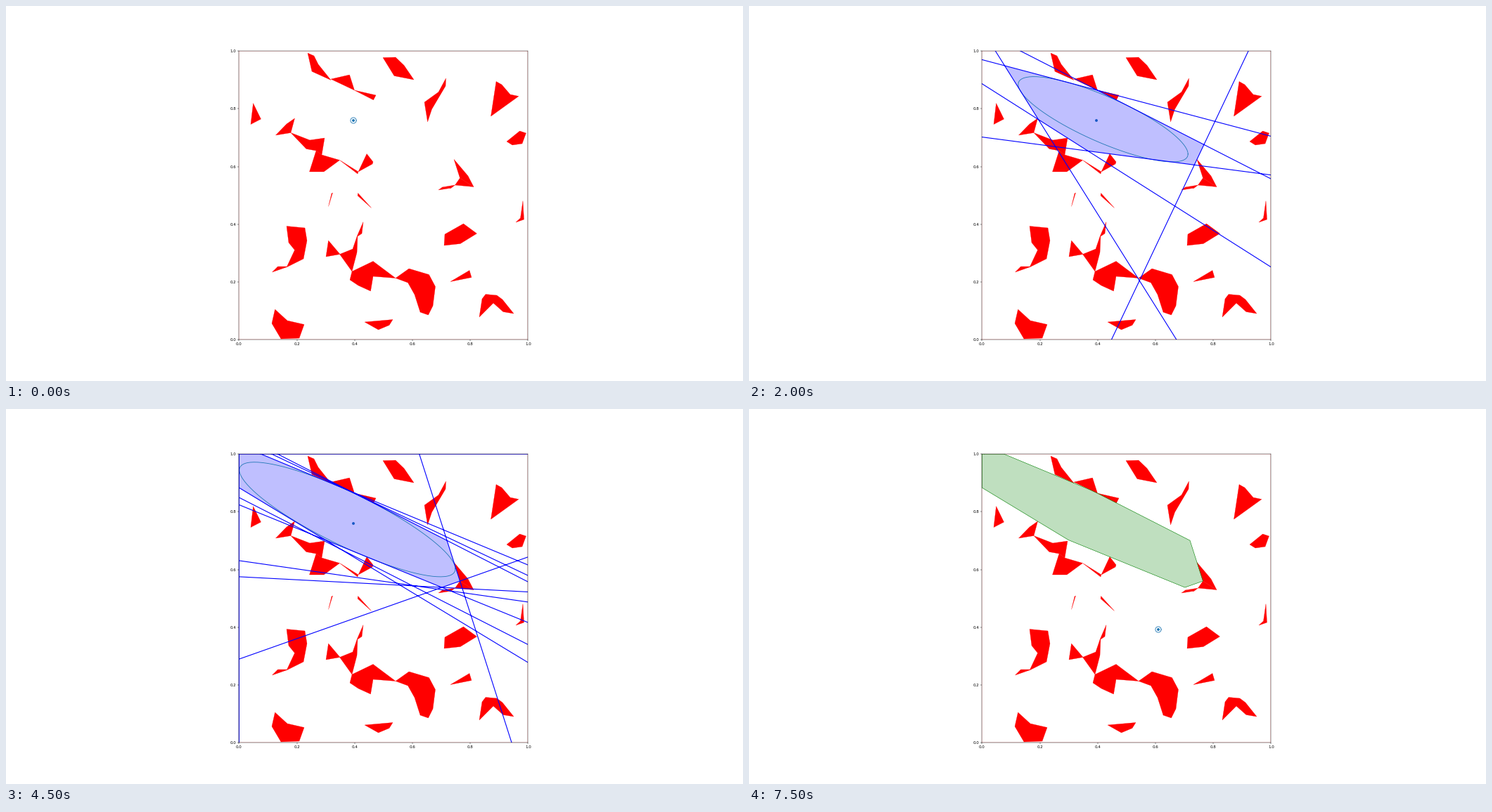
These frames come from a looping animation (1048 px wide and 534 px high, 8 s). A matplotlib script:

```python
import numpy as np
import matplotlib.pyplot as plt
from matplotlib.animation import FuncAnimation

W, H, DPI = 1048, 534, 40
# Plot box on the stage, in pixels from the top left
L, R, T, B = 331.4, 742.4, 64.1, 475.2
STEP_MS, STEPS = 500, 16
FIRST_DONE = 13

fig = plt.figure(figsize=(W / DPI, H / DPI), dpi=DPI)
ax = fig.add_axes([L / W, 1 - B / H, (R - L) / W, (B - T) / H])
ax.set_xlim(0, 1)
ax.set_ylim(0, 1)

rocks = []


def unit(points):
    """Stage pixels to axes units."""
    p = np.asarray(points, float)
    return np.column_stack([(p[:, 0] - L) / (R - L), (B - p[:, 1]) / (B - T)])


def rock(*points):
    rocks.append(np.array(points, float))
    ax.fill(*unit(points).T, color="red", lw=0.5)


# Top
rock((429, 67), (438, 71), (444, 83), (462, 105.5), (435, 93.2))
rock((462, 104.1), (488.5, 98), (495.5, 120))
rock((495.5, 120), (526, 127), (522.5, 133.8))
rock((536, 73.5), (554, 73), (566, 84.5), (580, 105), (552, 99.5))
rock((625.5, 103), (625, 114), (605.5, 147), (599.5, 165), (595, 137),
     (615, 122.5))
rock((697, 107.5), (705, 112), (717, 126), (729, 128.5), (689.5, 157))
rock((351.5, 138.5), (362.5, 161), (348, 168.5))
rock((712, 193), (730.5, 178), (739.5, 181), (734, 196), (720, 198))

# Chain in the middle
rock((383.5, 184), (399, 168), (410.5, 160), (405, 180.5))
rock((405, 180.5), (432, 191), (453, 188), (449, 212), (441, 206),
     (427, 203.5))
rock((441, 206), (449, 212), (474.5, 219.5), (452, 236), (431.5, 236))
rock((474.5, 219.5), (501, 236), (500, 239))
rock((501, 236), (513, 210.5), (522, 222), (521, 225))

# Hook on the right
rock((637, 218.4), (657, 242), (665, 257.5), (645.5, 245))
rock((645.5, 245), (665, 257.5), (638.5, 255))
rock((638.5, 255), (633, 259.2), (620.5, 258))
rock((633, 259.2), (615, 262), (620.5, 258))

# Slivers
rock((464.5, 266), (458.5, 285.5), (463, 267))
rock((500.5, 266.5), (519.5, 287.5), (500, 270))
rock((735, 277.5), (736.5, 304), (725, 308), (731.5, 302))

# Bottom
rock((399, 313.5), (425, 316), (428, 334), (423, 360), (400, 371.5),
     (378.5, 379), (386.5, 371), (399.5, 371), (410.5, 347.5), (402, 337))
rock((455, 357), (458.5, 334), (475, 353.5))
rock((508, 307.5), (506, 324), (500, 328), (499, 351), (492, 378),
     (474.5, 353.5), (493, 346), (499.5, 327))
rock((492, 378), (522, 363.5), (554, 387.5), (522, 385), (518.5, 406),
     (501, 398), (489, 390))
rock((554, 387.5), (573, 374), (601.5, 382.5), (610.5, 399.5), (607, 427),
     (600.5, 440), (589, 436), (581, 411), (571.5, 394))
rock((650.5, 310), (669.5, 324), (646, 338.5), (623, 341), (624, 325))
rock((632, 392.5), (659, 376.5), (662, 386.5))
rock((673, 443), (677, 417), (682, 410.5), (698, 412), (706, 418),
     (722, 438), (707, 435.5), (693, 423))
rock((382.5, 432), (400, 448), (424, 453.5), (417, 473), (391, 474),
     (378, 452))
rock((510, 450), (550, 446.5), (545, 454.5), (529.5, 461))

# Walls
BOX = [(L, T), (R, T), (R, B), (L, B)]
for a, b in zip(BOX, BOX[1:] + BOX[:1]):
    rock(a, b)

# Growing ellipse: centre, half width, half height, correlation
ELLIPSES = [
    (494, 163, 4.1, 4.1, 0),
    (495.3, 161.1, 65, 41.3, 0.415),
    (503.5, 161.3, 120.7, 60.7, 0.8155),
    (483.3, 157, 151.4, 80.4, 0.862),
    (485.4, 157.3, 153.5, 81.6, 0.861),
]
SEEDS = [(494, 163), (444.7, 181.7), (582, 314)]


def oval(cx, cy, rx, ry, corr):
    t = np.linspace(0, 2 * np.pi, 181)
    x = cx + rx * np.cos(t)
    y = cy + ry * (corr * np.cos(t) + np.sqrt(1 - corr**2) * np.sin(t))
    return unit(np.column_stack([x, y]))


def disc(seed, radius):
    return oval(*seed, radius, radius, 0)


def nearest(points, centre, metric):
    """Closest outline point to the centre, and its squared distance."""
    a, b = points, np.roll(points, -1, axis=0)
    e, d = b - a, centre - a
    k = np.sum(d @ metric * e, axis=1) / np.sum(e @ metric * e, axis=1)
    p = a + np.clip(k, 0, 1)[:, None] * e
    dist = np.sum((p - centre) @ metric * (p - centre), axis=1)
    i = dist.argmin()
    return p[i], dist[i]


def carve(cx, cy, rx, ry, corr):
    """Lines (point, normal) that part the ellipse from every rock."""
    centre = np.array([cx, cy])
    cov = corr * rx * ry
    metric = np.linalg.inv([[rx * rx, cov], [cov, ry * ry]])
    cuts = []
    for r in sorted(rocks, key=lambda r: nearest(r, centre, np.eye(2))[1]):
        if any(np.all((r - p) @ n > -0.05) for p, n in cuts):
            continue
        p, _ = nearest(r, centre, metric)
        n = metric @ (p - centre)
        cuts.append((p, n / np.hypot(*n)))
    return cuts


def region(cuts):
    """Clip the plot box to the inner side of every line."""
    poly = [np.array(c) for c in BOX]
    for p, n in cuts:
        out = []
        for a, b in zip(poly, poly[1:] + poly[:1]):
            da, db = (a - p) @ n, (b - p) @ n
            if da <= 0:
                out.append(a)
            if da * db < 0:
                out.append(a + da / (da - db) * (b - a))
        poly = out
    return unit(poly)


def strokes(cuts):
    """All lines as one path with gaps."""
    path = []
    for p, n in cuts:
        along = np.array([-n[1], n[0]]) * 1000
        path += [p - along, p + along, (np.nan, np.nan)]
    return unit(path)


rounds = [carve(*e) for e in ELLIPSES]
regions = [region(c) for c in rounds]
paths = [strokes(c) for c in rounds]

dot, = ax.fill([0, 1, 1], [0, 0, 1], color="C0", lw=0)
area, = ax.fill([0, 1, 1], [0, 0, 1], alpha=0.25, lw=0)
rim, = ax.plot([], [], color="green", lw=1)
ring, = ax.plot([], [], color="C0", lw=1.5)
lines, = ax.plot([], [], color="blue", lw=2)


def draw(i):
    done = i >= FIRST_DONE
    last = len(ELLIPSES) - 1
    # The ellipse grows on even steps, the cuts follow on odd ones
    grown, cut = min(i // 2, last), min(max(i - 1, 0) // 2, last)
    seed = SEEDS[1 + (i == STEPS - 1) if done else 0]

    dot.set_xy(disc(seed, 1.95))
    dot.set_zorder(1.5 if done else 1)
    ring.set_data(*(disc(seed, 4.1) if done else oval(*ELLIPSES[grown])).T)

    poly = regions[cut]
    area.set_xy(poly)
    area.set_facecolor("green" if done else "blue")
    rim.set_data(*np.vstack([poly, poly[:1]]).T)
    lines.set_data(*paths[cut].T)

    area.set_visible(i > 0)
    lines.set_visible(0 < i < FIRST_DONE)
    rim.set_visible(done)
    return dot, area, rim, ring, lines


anim = FuncAnimation(fig, draw, frames=STEPS, interval=STEP_MS,
                     init_func=lambda: draw(0), repeat=True, repeat_delay=0)
plt.show()
```
